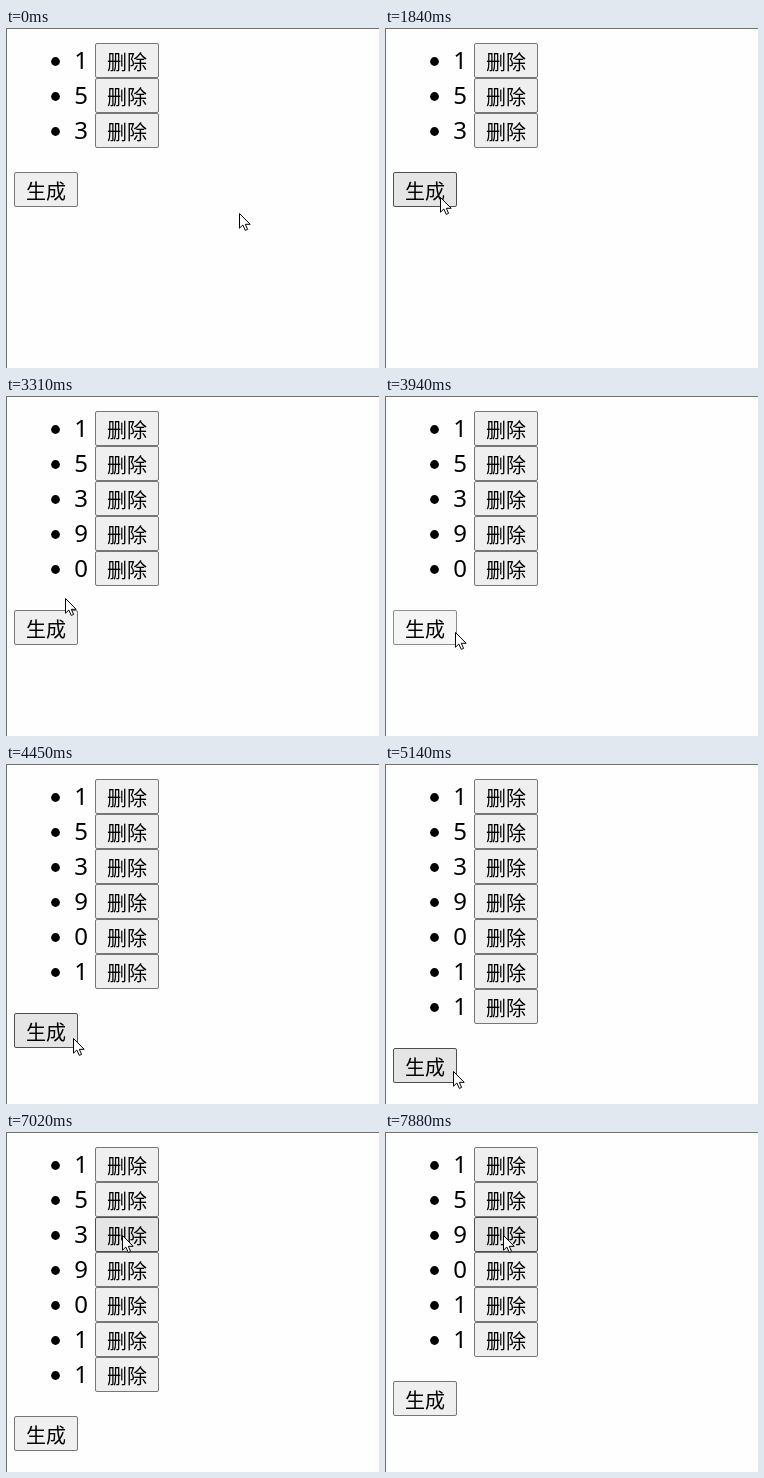
Recreate the animation shown at these times as an HTML page. Size 373 by 340 pixels, loop 8 s.

```html
<!DOCTYPE html>
<html lang="zh-CN">
<head>
<meta charset="utf-8">
<style>
  html, body { margin: 0; width: 100%; height: 100%; overflow: hidden; background: #fefefe; }
  svg { display: block; }
  text { text-anchor: middle; }
  .digit { font: 24px "Noto Sans", "Open Sans", sans-serif; }
  .button text { font: 300 20px "Noto Sans CJK SC", "Noto Sans CJK", sans-serif; }
  .button rect { fill: #efefef; stroke: #767676; }
  .hover rect { fill: #e5e5e5; stroke: #4f4f4f; }
  .active rect { fill: #f5f5f5; stroke: #8d8d8d; }
</style>
</head>
<body>
<svg width="373" height="340" viewBox="0 0 373 340">
  <path d="M0 .5H373M.5 0V340" stroke="#707070"/>
  <g id="page"></g>
  <path id="cursor" d="M.5 .5V15.2L3.8 12 6.3 17.4 8.6 16.4 6.3 11.3H11.2Z" fill="#fff" stroke="#000"/>
</svg>
<script>
const DURATION = 8000, STEP = 135, TOP = 15, WIDTH = 64, HEIGHT = 35;
const FIRST_DIGITS = [1, 5, 3], NEW_DIGITS = [9, 0, 1, 1];
const START = { x: 233, y: 185 };

// Pointer gestures; each one decelerates towards its end point.
const gestures = [
  { from: 1130, to: 1270, x: 199, y: 131 },
  { from: 1420, to: 1540, x: 113, y: 187 },
  { from: 1690, to: 1840, x: 55, y: 169 },
  { from: 2670, to: 2790, x: 67, y: 197 },
  { from: 2910, to: 2910, x: 59, y: 202 },
  { from: 3460, to: 3820, x: 70, y: 236 },
  { from: 4330, to: 4450, x: 67, y: 274 },
  { from: 4990, to: 5140, x: 68, y: 307 },
  { from: 5260, to: 5260, x: 72, y: 307 },
  { from: 5540, to: 6100, x: 113, y: 34 },
  { from: 6470, to: 6620, x: 118, y: 73 },
  { from: 6900, to: 7020, x: 116, y: 103 },
  { from: 7880, to: 7880, x: 118, y: 103 }
];

const clicks = [
  { down: 2240, up: 2390 }, { down: 3030, up: 3310 }, { down: 3940, up: 4060 },
  { down: 4720, up: 4870 }, { down: 7490, up: 7490 }
];

const page = document.getElementById('page');
const cursor = document.getElementById('cursor');
const easeOut = p => 1 - (1 - p) ** 2.5;

// The pointer advances in visible steps, the first one at the gesture's start.
function progress({ from, to }, t) {
  if (t >= to) return 1;
  const gaps = Math.round((to - from) / STEP);
  const done = Math.floor((t - from) / (to - from) * gaps) + 1;
  return easeOut(done / (gaps + 1));
}

function pointerAt(t) {
  let { x, y } = START;
  for (const g of gestures.filter(g => g.from <= t)) {
    const p = progress(g, t);
    x += (g.x - x) * p;
    y += (g.y - y) * p;
  }
  return { x: Math.round(x), y: Math.round(y) };
}

// One delete button per digit, then the add button below the list.
function layout(digits) {
  const rows = digits.map((digit, i) => ({ x: 89, y: TOP + i * HEIGHT, label: '删除', digit }));
  return [...rows, { x: 8, y: TOP + digits.length * HEIGHT + 24, label: '生成' }];
}

const contains = (b, p) =>
  p.x >= b.x && p.x <= b.x + WIDTH && p.y >= b.y && p.y < b.y + HEIGHT;

function digitsAt(t) {
  const digits = [...FIRST_DIGITS], fresh = [...NEW_DIGITS];
  for (const { up } of clicks.filter(c => c.up <= t)) {
    const hit = layout(digits).findIndex(b => contains(b, pointerAt(up)));
    if (hit === digits.length) digits.push(fresh.shift());
    else digits.splice(hit, 1);
  }
  return digits;
}

function drawItem({ x, y, label, digit }, state) {
  const item = digit === undefined ? '' :
    `<circle cx="49.5" cy="${y + 18.5}" r="4.4"/>
     <text class="digit" x="75" y="${y + 26}">${digit}</text>`;
  return `${item}<g class="button ${state}" transform="translate(${x} ${y})">
    <rect x=".5" y=".5" width="${WIDTH - 1}" height="${HEIGHT - 1}" rx="1.5"/>
    <text x="32" y="27">${label}</text></g>`;
}

let shown;
function draw(now) {
  const t = now % DURATION;
  const pointer = pointerAt(t);
  const pressed = clicks.some(c => t >= c.down && t < c.up);
  const stateOf = b => !contains(b, pointer) ? '' : pressed ? 'active' : 'hover';
  const markup = layout(digitsAt(t)).map(b => drawItem(b, stateOf(b))).join('');
  if (markup !== shown) page.innerHTML = shown = markup;
  cursor.setAttribute('transform', `translate(${pointer.x} ${pointer.y})`);
  requestAnimationFrame(draw);
}

draw(performance.now());
</script>
</body>
</html>
```
